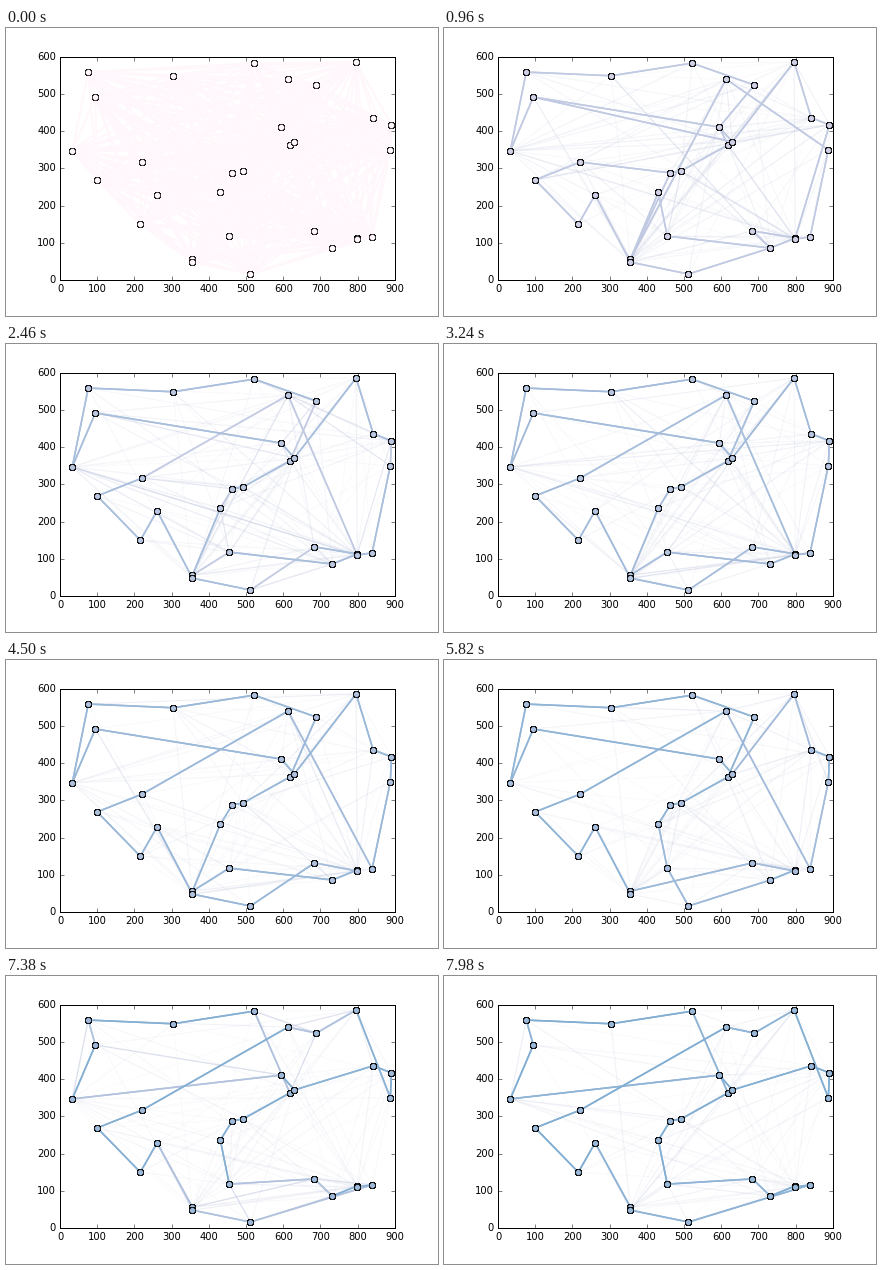
Animation of 432 by 288 pixels, one loop 8000 ms. Source, as a matplotlib script:

```python
import random
from itertools import combinations

import matplotlib.pyplot as plt
import numpy as np
from matplotlib.animation import FuncAnimation
from matplotlib.collections import LineCollection

TICK = 20          # ms per animation frame
LOOP = 8000        # ms
STEP = 60          # ms per colony iteration
RATE = 0.115       # evaporation per iteration
HUBS = "JLNcbVWXRMTCZ"

CITIES = {
    "A": (76, 559), "B": (95, 492), "C": (33, 347), "D": (100, 269),
    "E": (221, 317), "F": (261, 229), "G": (216, 150), "H": (304, 549),
    "I": (522, 583), "J": (613, 540), "K": (689, 524), "L": (796, 586),
    "M": (842, 436), "N": (891, 417), "O": (888, 350), "P": (595, 411),
    "Q": (618, 363), "R": (630, 371), "S": (463, 288), "T": (492, 293),
    "U": (431, 236), "V": (455, 118), "W": (356, 56), "X": (356, 48),
    "Y": (512, 16), "Z": (732, 86), "a": (684, 132), "b": (799, 113),
    "c": (799, 110), "d": (839, 116),
}

# start time in ms, favoured paths
PHASES = [
    (0, "AHIKPQTSEDGFXYZabNMLRBCA ZVUWJOdc BP SW PR Zb"),
    (1800, "AHIKQTSUWVZbaYXFGDEJcdONMLRPBCA"),
    (3360, "AHIKQTSUWVZbcaYXFGDEJdONMLRPBCA"),
    (4620, "AHIKQTSUVYZbcaWXFGDEJdONMLRPBCA"),
    (5820, "AHIKQTSUVYZbcdaWXFGDEJLONMRPBCA"),
    (6780, "AHIQTSUVaZbcdYXWFGDEJKLONMRPCBA"),
]

EDGES = list(combinations(CITIES, 2))
INDEX = {frozenset(e): i for i, e in enumerate(EDGES)}
SEGMENTS = np.array([(CITIES[p], CITIES[q]) for p, q in EDGES], float)


def path_mask(paths):
    mask = np.zeros(len(EDGES))
    for path in paths.split():
        for pair in zip(path, path[1:]):
            mask[INDEX[frozenset(pair)]] = 1
    return mask


def strength(ms):
    return 0.33 + 0.018 * ms / 1000


def run_colony():
    """Pheromone on every edge after each iteration."""
    rng = random.Random(7)
    masks = [(start, path_mask(paths)) for start, paths in PHASES]
    trail = np.zeros(len(EDGES))
    history = [trail.copy()]
    for step in range(1, LOOP // STEP + 1):
        ms = step * STEP
        mask = [m for start, m in masks if start <= ms][-1]
        trail += RATE * (strength(ms) * mask - trail)
        dose = 0.02 + 0.035 * np.exp(-ms / 2500)
        for _ in range(10):
            pair = frozenset((rng.choice(HUBS), rng.choice(list(CITIES))))
            if len(pair) == 2:
                i = INDEX[pair]
                trail[i] = max(trail[i], min(trail[i] + dose, 0.12))
        history.append(trail.copy())
    return history


HISTORY = run_colony()
CMAP = plt.get_cmap("PuBu")

plt.rcParams.update({
    "font.family": "DejaVu Sans", "font.size": 10, "text.hinting": "auto",
    "xtick.direction": "in", "ytick.direction": "in",
    "xtick.top": True, "ytick.right": True,
    "xtick.major.size": 4, "ytick.major.size": 4,
    "xtick.major.width": 0.5, "ytick.major.width": 0.5,
    "xtick.major.pad": 4, "ytick.major.pad": 4,
    "ytick.alignment": "center",
    "axes.linewidth": 1.0,
})

fig = plt.figure(figsize=(6, 4), dpi=72, facecolor="white")
ax = fig.add_axes([0.125, 0.125, 0.775, 0.775])
ax.set_xlim(0, 900)
ax.set_ylim(0, 600)
ax.set_xticks(range(0, 901, 100))
ax.set_yticks(range(0, 601, 100))

mesh = LineCollection(SEGMENTS, colors=[CMAP(0.0)], linewidths=2, zorder=1)
trails = LineCollection([], zorder=2, capstyle="butt")
ax.add_collection(mesh)
ax.add_collection(trails)

# every edge stamps both of its cities, which hardens the marker outlines
stamps = np.repeat(list(CITIES.values()), len(CITIES) - 1, axis=0)
nodes, = ax.plot(*stamps.T, "o", markersize=6, markeredgecolor="black",
                 zorder=3, clip_on=False)


def draw(frame):
    step = frame * TICK // STEP
    trail = HISTORY[step]

    fade = max(0, 1 - step / 8)
    mesh.set_alpha(fade)
    mesh.set_visible(fade > 0)

    order = np.argsort(trail)
    order = np.repeat(order[trail[order] > 0.008], 2)   # both directions
    level = trail[order]
    share = np.clip(level / 0.3, 0, 1)
    colors = CMAP(np.maximum(level, 0.28))
    colors[:, 3] = share
    trails.set_segments(SEGMENTS[order])
    trails.set_color(colors)
    trails.set_linewidth(0.9 + 0.7 * share)

    fill = strength(step * STEP) * (1 - (1 - RATE) ** step)
    nodes.set_markerfacecolor(CMAP(0.85 * fill))
    nodes.set_markeredgewidth(0.5 + 0.2 * min(1, step / 6))
    return mesh, trails, nodes


anim = FuncAnimation(fig, draw, frames=LOOP // TICK, interval=TICK,
                     init_func=lambda: draw(0), repeat=True, repeat_delay=0)
plt.show()
```
